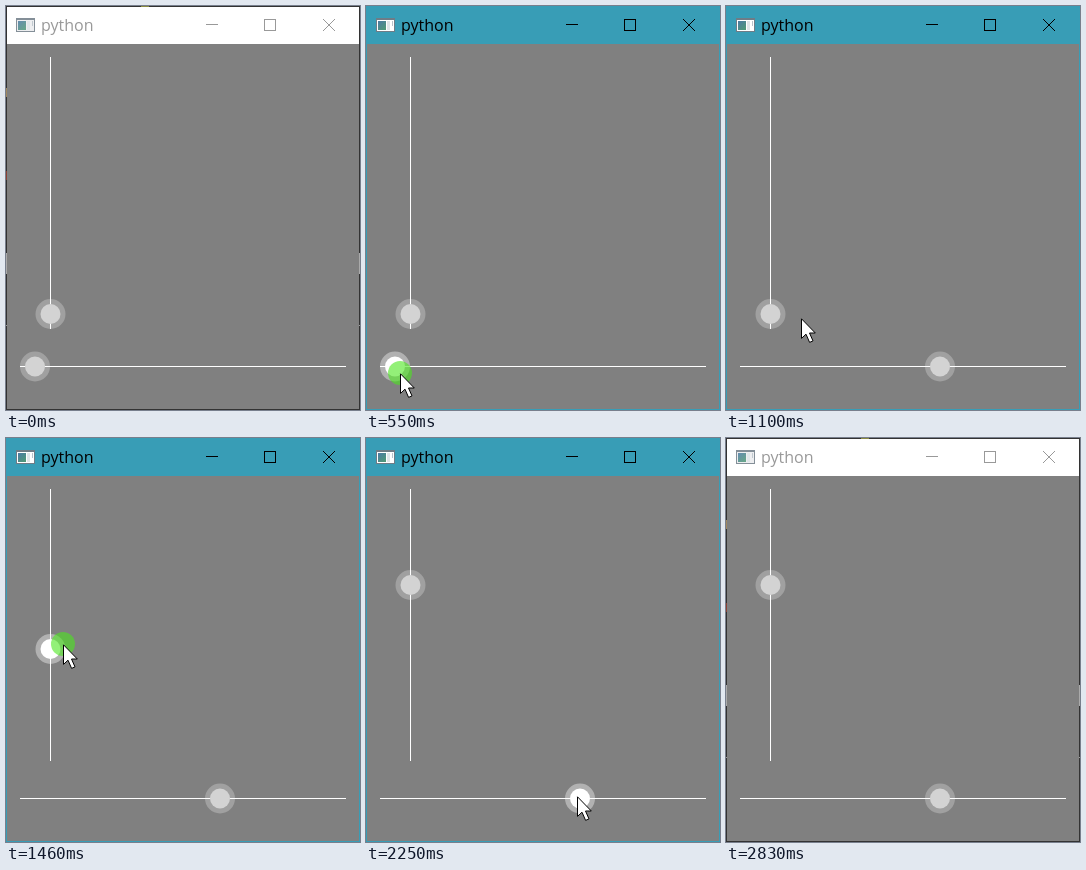
An HTML page with a canvas that plays this animation: 354x404 px, repeating every 2890 ms.

```html
<!DOCTYPE html>
<html lang="en">
<head>
<meta charset="utf-8">
<title>Sliders</title>
<style>
  html, body { margin: 0; width: 100%; height: 100%; overflow: hidden; }
  canvas { display: block; }
</style>
</head>
<body>
<canvas id="stage" width="354" height="404"></canvas>
<script>
const W = 354, H = 404, LOOP = 2890, STEP = 60;
const ctx = document.getElementById('stage').getContext('2d');

// Pointer path: time, x, y
const path = [
  [60, 130, 396], [300, 42, 373], [420, 34, 367], [550, 34, 367],
  [730, 157, 367], [850, 222, 367], [980, 222, 367], [1100, 75, 312],
  [1220, 57, 303], [1280, 57, 303], [1580, 57, 142], [1770, 57, 142],
  [2250, 211, 358], [2380, 222, 372], [2440, 234, 391], [2500, 234, 404]
];
const between = (t, a, b) => t >= a && t < b;
const clamp = (v, a, b) => Math.min(b, Math.max(a, v));

function pointerAt(t) {
  if (!between(t, 60, 2500)) return null;
  const i = path.findLastIndex(k => k[0] <= t);
  const [t0, x0, y0] = path[i], [t1, x1, y1] = path[i + 1];
  if (t1 - t0 === 130) return { x: x0, y: y0 };
  let p = Math.floor((t - t0) / STEP) * STEP / (t1 - t0);
  if (t0 === 1770) p = p * p * (3 - 2 * p);
  return { x: Math.round(x0 + (x1 - x0) * p), y: Math.round(y0 + (y1 - y0) * p) };
}

function rect(color, x, y, w, h) {
  ctx.fillStyle = color;
  ctx.fillRect(x, y, w, h);
}

function disc(color, x, y, r) {
  ctx.fillStyle = color;
  ctx.beginPath();
  ctx.arc(x, y, r, 0, 7);
  ctx.fill();
}

function drawFrame(active) {
  rect(active ? '#389db6' : '#333', 0, 0, W, H);
  if (!active) {
    // Bits of the desktop behind the thin border
    for (const x of [0, W - 1]) {
      rect('#aaa', x, 247, 1, 21);
      rect('#999', x, 319, 1, 1);
    }
    rect('#a08860', 0, 82, 1, 9);
    rect('#8a4034', 0, 165, 1, 9);
    rect('#8a8a40', 135, 0, 8, 1);
  }
  rect(active ? '#389db6' : '#fff', 1, 1, W - 2, 37);
  rect('#808080', 1, 38, W - 2, H - 39);
}

function drawIcon(active) {
  ctx.globalAlpha = active ? 1 : 0.85;
  rect('#6f7c86', 10, 12, 19, 14);
  rect('#fff', 11, 14, 17, 11);
  const shade = ctx.createLinearGradient(12, 14, 20, 24);
  shade.addColorStop(0, '#4b78a8');
  shade.addColorStop(1, '#4f9b73');
  rect(shade, 12, 15, 8, 9);
  rect('#dfe5e8', 21, 15, 3, 9);
  rect('#b9c3ca', 26, 15, 1, 5);
  ctx.globalAlpha = 1;
}

function drawTitle(active) {
  const ink = active ? '#000' : '#999';
  drawIcon(active);
  ctx.fillStyle = ink;
  ctx.font = '16px "Open Sans", "Noto Sans", sans-serif';
  ctx.fillText('python', 35, 25);
  rect(ink, 200, 18, 12, 1);
  ctx.strokeStyle = ink;
  ctx.lineWidth = 1;
  ctx.strokeRect(258.5, 13.5, 11, 11);
  ctx.beginPath();
  ctx.moveTo(317, 13);
  ctx.lineTo(329, 25);
  ctx.moveTo(329, 13);
  ctx.lineTo(317, 25);
  ctx.stroke();
}

function drawHandle(x, y, pointer) {
  const hover = pointer && Math.hypot(pointer.x - x, pointer.y - y) < 15.5;
  disc(hover ? 'rgba(255,255,255,.39)' : 'rgba(255,255,255,.25)', x, y, 15);
  disc(hover ? '#fff' : '#d3d3d3', x, y, 10);
}

const arrow = new Path2D(
  'M.5 .8V20.4L5 16.2L8.6 24.4L12 22.9L8.5 15H14.3Z');

function drawPointer({ x, y }, pressed) {
  if (pressed) disc('rgba(75,230,30,.6)', x, y, 12);
  ctx.save();
  ctx.translate(x, y);
  ctx.fillStyle = '#fff';
  ctx.strokeStyle = '#000';
  ctx.lineWidth = 1;
  ctx.fill(arrow);
  ctx.stroke(arrow);
  ctx.restore();
}

function draw(t) {
  const active = between(t, 550, 2830);
  const pointer = pointerAt(t);
  const dragX = between(t, 550, 980), dragY = between(t, 1280, 1770);
  const handleX = dragX ? clamp(pointer.x - 8, 29, 214) : t < 550 ? 29 : 214;
  const handleY = dragY ? clamp(pointer.y + 5, 147, 308) : t < 1280 ? 308 : 147;

  drawFrame(active);
  drawTitle(active);
  rect('#fff', 44, 51, 1, 272);
  rect('#fff', 14, 360, 326, 1);
  drawHandle(44.5, handleY, pointer);
  drawHandle(handleX, 360.5, pointer);
  if (pointer) drawPointer(pointer, dragX || dragY);
}

const start = performance.now();
function tick() {
  draw((performance.now() - start) % LOOP);
  requestAnimationFrame(tick);
}
tick();
</script>
</body>
</html>
```
